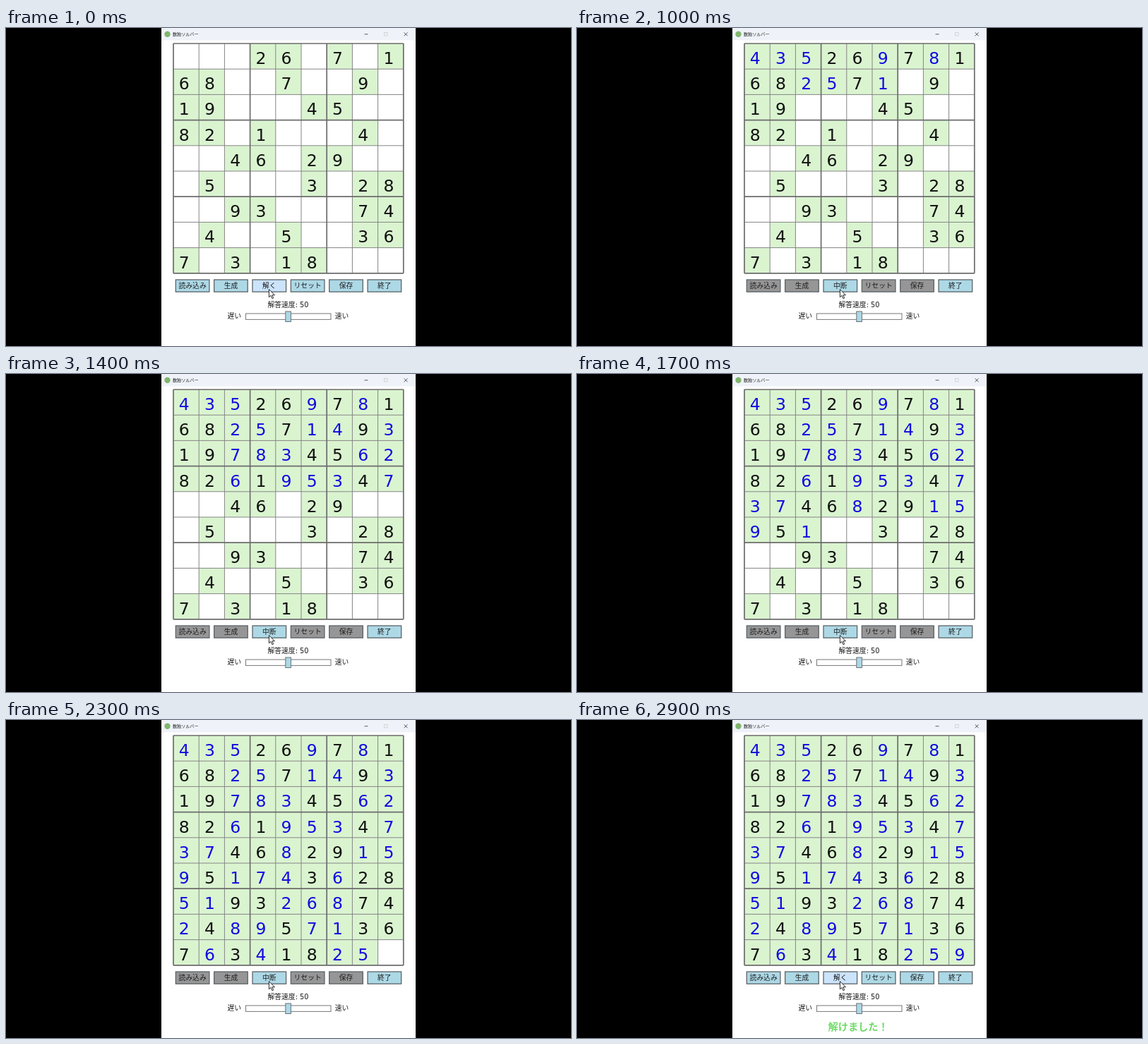
Recreate the animation shown at these times as an HTML page. Size 800 by 451 pixels, loop 3000 ms.

```html
<!DOCTYPE html>
<html lang="ja">
<head>
<meta charset="utf-8">
<title>数独ソルバー</title>
<style>
  html, body { margin: 0; width: 100%; height: 100%; overflow: hidden; background: #000; }
  svg { display: block; width: 100vw; height: 100vh; }
  text { font-family: "DejaVu Sans", "Noto Sans CJK JP", "Noto Sans CJK", sans-serif; fill: #1c1c1c; }
  .mid { text-anchor: middle; }
  .label { font-size: 9.8px; }
  .digit { font-size: 23.5px; fill: #111; }
  .solved { fill: #120ce0; }
  .cell { fill: #daf4d0; }
  .thin { stroke: #858585; stroke-width: 1; }
  .thick { stroke: #6c6c6c; stroke-width: 1.7; }
  .box { stroke: #5c6468; stroke-width: 1.3; }
</style>
</head>
<body>
<svg id="stage" viewBox="0 0 800 451" preserveAspectRatio="none">
  <rect width="800" height="451"/>
  <rect x="220" width="360" height="451" fill="#fff"/>
  <rect x="220" width="360" height="17.5" fill="#eff3f9"/>
  <circle cx="228.5" cy="8.8" r="4.2" fill="#7fb56c"/>
  <text x="236" y="11.3" font-size="6.1">数独ソルバー</text>
  <g fill="none" stroke="#333" stroke-width=".8">
    <path d="M507.5 8.8h5M563.6 6.3l5 5m0-5l-5 5"/>
    <rect x="535.6" y="6.5" width="4.4" height="4.4" stroke="#ccc"/>
  </g>
  <g id="cells"></g>
  <g id="lines"></g>
  <g id="digits"></g>
  <g id="buttons"></g>
  <text class="label mid" x="399.5" y="395.8">解答速度: 50</text>
  <text class="label" x="313.5" y="412">遅い</text>
  <text class="label" x="465.7" y="412">速い</text>
  <rect x="339.5" y="405" width="120.5" height="8.4" fill="#fff" stroke="#777"/>
  <rect x="395.8" y="402" width="7.6" height="14.5" fill="#add8e6" stroke="#6b7377"/>
  <text id="message" x="355.5" y="439.8" font-size="14.2" font-weight="700" style="fill:#6fdc68">解けました！</text>
  <path d="M372.4 370.6v11.2l2.6-2.4 1.9 4.3 1.8-.8-1.9-4.1h3.6z" fill="#fff" stroke="#111" stroke-width=".9"/>
</svg>
<script>
  const LOOP = 3000, STEP = 100, START = 700, DONE = 2400;
  const LEFT = 237, TOP = 22, SIZE = 36.2;
  const solution = [
    "435269781", "682571493", "197834562",
    "826195347", "374682915", "951743628",
    "519326874", "248957136", "763418259"
  ];
  // 1 marks a digit given by the puzzle
  const givens = [
    "000110101", "110010010", "110001100",
    "110100010", "001101100", "010001011",
    "001100011", "010010011", "101011000"
  ];
  // cells solved at each step from START
  const progress = [0, 2, 5, 8, 11, 14, 17, 20, 22, 25, 27, 30, 33, 36, 38, 41, 44, 45];
  const names = ["読み込み", "生成", "解く", "リセット", "保存", "終了"];
  const IDLE = "#add8e6", HOVER = "#cbe3fb", OFF = "#969696";

  const $ = id => document.getElementById(id);

  function add(parent, tag, attrs, text = "") {
    const el = document.createElementNS("http://www.w3.org/2000/svg", tag);
    for (const key in attrs) el.setAttribute(key, attrs[key]);
    el.textContent = text;
    $(parent).append(el);
    return el;
  }

  const blanks = [];
  solution.forEach((row, r) => [...row].forEach((digit, c) => {
    const given = givens[r][c] === "1";
    const x = c * SIZE, y = r * SIZE;
    const cell = add("cells", "rect", { class: "cell", x: LEFT + x, y: TOP + y, width: SIZE, height: SIZE });
    const mark = add("digits", "text", {
      class: "digit mid" + (given ? "" : " solved"), x: 252.3 + x, y: 51 + y
    }, digit);
    if (!given) blanks.push([cell, mark]);
  }));

  for (const kind of ["thin", "thick"]) {
    for (let i = 0; i < 10; i++) {
      if ((i % 3 === 0) !== (kind === "thick")) continue;
      const d = i * SIZE, span = 9 * SIZE;
      add("lines", "path", { class: kind, d: `M${LEFT + d} ${TOP}v${span}M${LEFT} ${TOP + d}h${span}` });
    }
  }

  const buttons = names.map((name, i) => {
    const x = 240.3 + i * 54.35;
    return {
      face: add("buttons", "rect", { class: "box", x, y: 357, width: 47.6, height: 17.2 }),
      label: add("buttons", "text", { class: "label mid", x: x + 23.8, y: 368.8 }, name)
    };
  });

  function show(el, on) {
    el.style.visibility = on ? "visible" : "hidden";
  }

  function draw(now) {
    const t = Math.floor(now % LOOP / STEP) * STEP;
    const busy = t >= START && t < DONE;
    const step = Math.min((t - START) / STEP, progress.length - 1);
    const count = step < 0 ? 0 : progress[step];
    blanks.forEach(pair => pair.forEach(el => show(el, blanks.indexOf(pair) < count)));
    buttons.forEach(({ face }, i) => {
      const color = i === 2 ? (busy ? IDLE : HOVER) : busy && i < 5 ? OFF : IDLE;
      face.setAttribute("fill", color);
    });
    buttons[2].label.textContent = busy ? "中断" : names[2];
    show($("message"), t >= DONE);
  }

  let origin;
  function tick(now) {
    origin ??= now;
    draw(now - origin);
    requestAnimationFrame(tick);
  }
  draw(0);
  requestAnimationFrame(tick);
</script>
</body>
</html>
```
